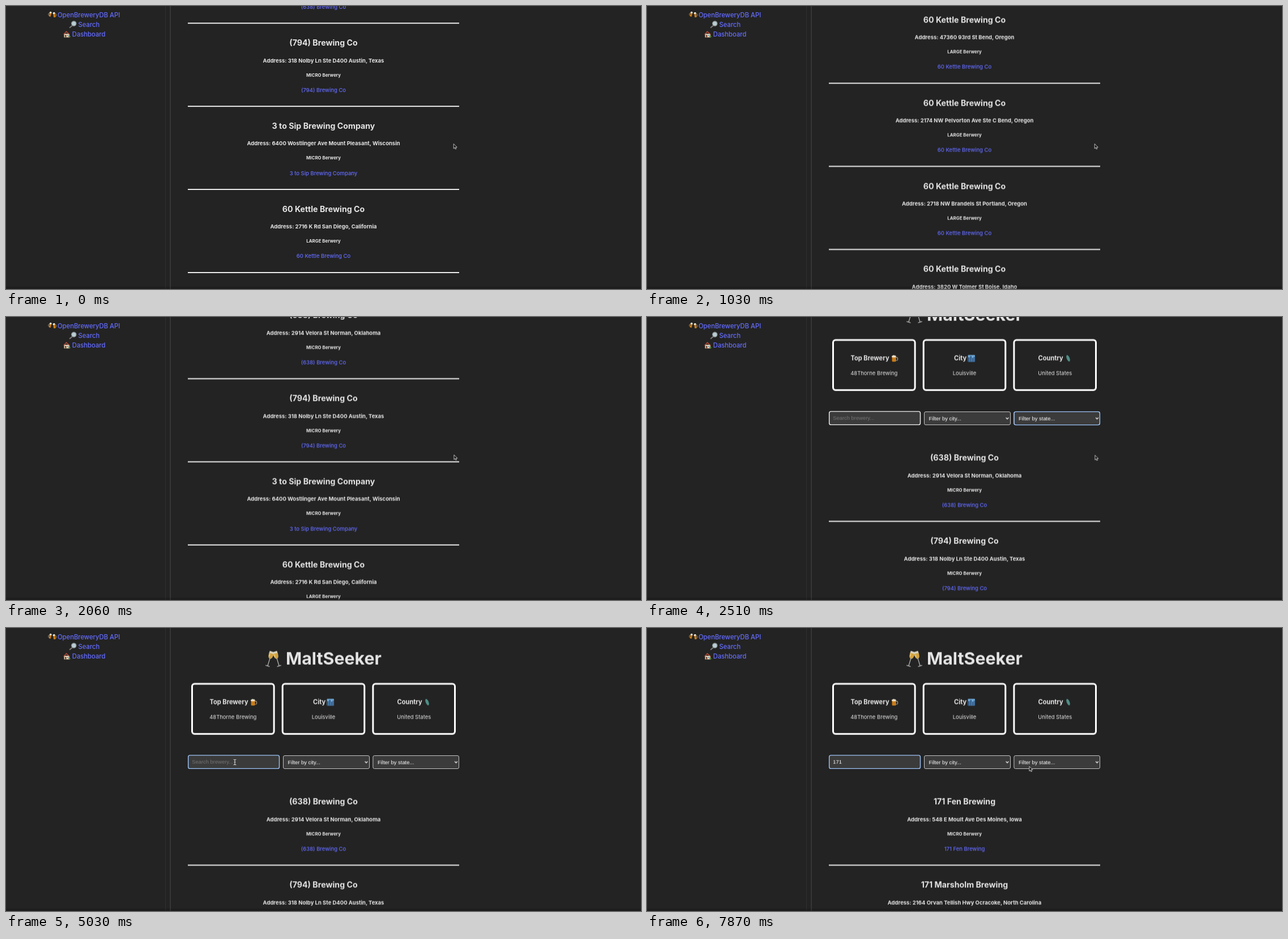
These frames come from a looping animation (1121 px wide and 500 px high, 8 s). An HTML page:

```html
<!DOCTYPE html>
<html lang="en">
<head>
<meta charset="utf-8">
<title>Brewery list</title>
<style>
html, body { margin: 0; width: 100%; height: 100%; overflow: hidden; background: #232323; }
svg { display: block; width: 1121px; height: 500px; }
text { font-family: Inter, sans-serif; font-optical-sizing: none; fill: #e4e4e4; white-space: pre; }
.mid { text-anchor: middle; }
.h1 { font-size: 30.3px; font-weight: 700; }
.h2 { font-size: 14.2px; font-weight: 700; }
.h3 { font-size: 11.08px; font-weight: 700; }
.h4 { font-size: 9.47px; font-weight: 700; }
.h5 { font-size: 7.86px; font-weight: 700; }
.p { font-size: 9.47px; }
.link { font-size: 9.47px; font-weight: 500; fill: #646cff; }
.nav { font-size: 11.24px; font-weight: 500; fill: #646cff; }
.field { font: 9.42px "Liberation Sans", Arial, sans-serif; fill: #fff; }
.hint { fill: #757575; }
.box { fill: #3b3b3b; stroke: #c4c4c4; }
.card { fill: none; stroke: #fff; stroke-width: 3; }
.edge { fill: none; stroke: #f2f2f2; stroke-width: 1.4; }
.ring { fill: none; stroke: #9cc4f7; stroke-width: 1.4; }

.anim { animation: 8s step-end -4ms infinite; }
#page { animation-name: scroll; }
#arrow { animation-name: arrow; }
#beam { animation-name: beam; }
#caret { animation-name: caret; }
#endCaret { animation-name: endCaret; }
#typed2 { animation-name: typed2; }
#typed3, #found { animation-name: late; }
#all { animation-name: early; }
#hint { animation-name: hint; }
#stateRing, #searchEdge { animation-name: beforeFocus; }
#searchRing { animation-name: afterFocus; }

@keyframes scroll {
  0% { transform: translateY(-388.6px); }
  1.875% { transform: translateY(-480px); }
  3.625% { transform: translateY(-510px); }
  9.25% { transform: translateY(-779.6px); }
  11.125% { transform: translateY(-850px); }
  12.875% { transform: translateY(-870px); }
  18.5% { transform: translateY(-790px); }
  20.25% { transform: translateY(-654.9px); }
  24% { transform: translateY(-480px); }
  25.75% { transform: translateY(-310px); }
  27.625% { transform: translateY(-260px); }
  31.375% { transform: translateY(-58px); }
  33.25% { transform: translateY(-8px); }
  35%, 100% { transform: none; }
}
@keyframes arrow {
  0% { transform: translate(789.7px, 243px); opacity: 1; }
  20.25% { transform: translate(790.4px, 243px); }
  31.375% { transform: translate(790.4px, 243.6px); }
  36.875% { transform: translate(752px, 242px); }
  38.75% { transform: translate(640px, 238px); }
  40.625% { transform: translate(500px, 235px); opacity: 1; }
  42.375% { transform: translate(674.4px, 244px); opacity: 0; }
  98.375%, 100% { transform: translate(674.4px, 244px); opacity: 1; }
}
@keyframes beam { 0%, 87.25%, 100% { opacity: 0; } 42.375% { opacity: 1; } }
@keyframes caret {
  0%, 49.75%, 62.875%, 74.125%, 87.25%, 100% { opacity: 0; }
  44.25%, 55.375%, 68.5%, 81.625% { opacity: 1; }
}
@keyframes endCaret { 0%, 96.5%, 100% { opacity: 0; } 89% { opacity: 1; } }
@keyframes typed2 { 0%, 89%, 100% { opacity: 0; } 87.25% { opacity: 1; } }
@keyframes late { 0% { opacity: 0; } 89%, 100% { opacity: 1; } }
@keyframes early { 0% { opacity: 1; } 89%, 100% { opacity: 0; } }
@keyframes hint { 0% { opacity: 1; } 87.25%, 100% { opacity: 0; } }
@keyframes beforeFocus { 0% { opacity: 1; } 44.25%, 100% { opacity: 0; } }
@keyframes afterFocus { 0% { opacity: 0; } 44.25%, 100% { opacity: 1; } }
</style>
</head>
<body>
<svg viewBox="0 0 1121 500">
  <defs>
    <g id="mug">
      <path d="M8 4.5h2.2q1.4 0 1.4 1.5v2q0 1.6-1.4 1.6H8" fill="none" stroke="#b9a98c" stroke-width="1.1"/>
      <path d="M1.6 2.5h6.8v8.3q0 1-1 1H2.6q-1 0-1-1z" fill="#d98a1f"/>
      <path d="M3.4 5v5.5M6.2 5v5.5" stroke="#a85f13" stroke-width=".9"/>
      <path d="M1 3.6q-.6-2 1.4-2.3Q4-.2 5.6.8q2.6-.4 3.2 1.6 0 1.6-1.6 1.5-.6 1.4-1.6.2-2.6.7-4.6-.5z" fill="#f0e6d2"/>
    </g>
    <g id="flute">
      <path d="M-4-13h8q.8 9-1.800 12.300-2.200 2-4.400 0Q-4.800-4-4-13z" fill="#d8d3bd"/>
      <path d="M-4-9.500h8q0 6-2.100 8.600-1.900 1.500-3.800 0Q-4-3.500-4-9.500z" fill="#d3a23c"/>
      <path d="M-2.200-8v4.500" stroke="#f2da8e" stroke-width="1.200"/>
      <path d="M0 0v13M-3.300 13.500h6.600" stroke="#b9bbb8" stroke-width="1.300" stroke-linecap="round"/>
    </g>
    <path id="chevron" d="M-2.400-1.300 0 1.200 2.400-1.300" fill="none" stroke="#fff" stroke-width="1.300"/>
    <rect id="search" x="321.700" y="224.900" width="160.800" height="23.500" rx="3"/>
  </defs>

  <rect width="1121" height="500" fill="#232323"/>
  <rect x="281" width="1" height="500" fill="#303030"/>
  <rect x="289.500" width="1.200" height="500" fill="#454545"/>

  <g id="nav">
    <use href="#mug" transform="translate(81.500 10) rotate(12) scale(-.48 .78)"/>
    <use href="#mug" transform="translate(81.800 11) rotate(-10) scale(.52 .8)"/>
    <text class="nav" x="91" y="19.500">OpenBreweryDB API</text>
    <path d="M117 34.500 112.800 38" stroke="#777" stroke-width="2.200" stroke-linecap="round"/>
    <circle cx="119.800" cy="31" r="4.200" fill="#b9cdd3" stroke="#858b8e" stroke-width="1.200"/>
    <text class="nav" x="127.600" y="36.700">Search</text>
    <path d="M102.500 49h9.500v6.500h-9.500z" fill="#dccdb4"/>
    <path d="M101 50 106.500 44l6.500 6-1 .8-5.500-4.300-4.500 4.300z" fill="#b04a35"/>
    <path d="M104 51h2.500v4.500H104z" fill="#7c4a2e"/>
    <path d="M108 51h2.500v2H108z" fill="#6fa3c4"/>
    <circle cx="112" cy="54" r="1.700" fill="#55803a"/>
    <text class="nav" x="116.800" y="53.800">Dashboard</text>
  </g>

  <g id="page" class="anim">
    <use href="#flute" transform="translate(465.800 54) rotate(17)"/>
    <use href="#flute" transform="translate(478.200 54) rotate(-17)"/>
    <text class="h1" x="494" y="65">MaltSeeker</text>

    <g id="cards"></g>
    <use href="#mug" transform="translate(431 125)"/>
    <rect x="566.500" y="125" width="12.500" height="12" rx="1" fill="#6fa9d6"/>
    <path d="M567 137v-8h2.500v8zm3.500 0v-10h2.500v10zm3.500 0v-7h2v7zm2.700 0v-9h1.800v9z" fill="#2d5583"/>
    <ellipse cx="743.500" cy="131" rx="2.600" ry="6" fill="#4f8f88" transform="rotate(-22 743.500 131)"/>

    <use href="#search" fill="#3b3b3b"/>
    <rect class="box" x="489.500" y="225.500" width="152" height="23" rx="2.500"/>
    <rect class="box" x="647.900" y="225.500" width="151.600" height="23" rx="2.500"/>
    <rect id="stateRing" class="ring anim" x="648" y="225.400" width="151.400" height="23.200" rx="3"/>
    <use id="searchEdge" class="edge anim" href="#search"/>
    <use id="searchRing" class="ring anim" href="#search"/>
    <text id="hint" class="field hint anim" x="328.200" y="240">Search brewery...</text>
    <text id="typed2" class="field anim" x="328.200" y="240">17</text>
    <text id="typed3" class="field anim" x="328.200" y="240">171</text>
    <rect id="caret" class="anim" x="328" y="232" width="1" height="10" fill="#e8e8e8"/>
    <rect id="endCaret" class="anim" x="343.300" y="232" width="1" height="10" fill="#e8e8e8"/>
    <text class="field" x="497.500" y="240.400">Filter by city...</text>
    <text class="field" x="656" y="240.400">Filter by state...</text>
    <use href="#chevron" x="636" y="237"/>
    <use href="#chevron" x="794.500" y="237"/>

    <g id="all" class="anim"></g>
    <g id="found" class="anim"></g>
  </g>

  <rect y="496" width="1121" height="4" fill="#000" opacity=".15"/>

  <path id="beam" class="anim" d="M401.600 232.200q2.400 0 2.400 1.600 0-1.600 2.400-1.600M404 233.500v7M401.600 241.800q2.400 0 2.400-1.600 0 1.600 2.400 1.600M402.600 237h2.800"
    fill="none" stroke="#d0d0d0" stroke-width="1.100"/>
  <path id="arrow" class="anim" d="M.4.500v8.300l1.900-1.700 1.200 2.800 1.500-.6-1.200-2.800h2.500z" fill="#111" stroke="#eee" stroke-width=".8" stroke-linejoin="round"/>
</svg>
<script>
const CENTER = 560.5, TOP = 307, PITCH = 146.85;
const fill = (id, html) => { document.getElementById(id).innerHTML = html; };
const label = (cls, x, y, str) => `<text class="${cls}" x="${x}" y="${y}">${str}</text>`;

const card = ([x, titleX, title, value]) =>
  `<rect class="card" x="${x + 1.5}" y="98.500" width="144.600" height="88.700" rx="4.500"/>` +
  label('h3', titleX, 135, title) + label('p mid', x + 73.8, 161, value);

const brewery = ([name, address, size = 'LARGE'], i) => {
  const y = TOP + i * PITCH;
  return label('h2 mid', CENTER, y + 5.1, name) +
    label('h4 mid', CENTER, y + 34.4, 'Address: ' + address) +
    label('h5 mid', CENTER, y + 59.4, size + ' Berwery') +
    label('link mid', CENTER, y + 86.5, name) +
    `<rect x="321" y="${y + 111.1}" width="479" height="1.8" fill="#fff"/>`;
};

fill('cards', [
  [327, 359.4, 'Top Brewery', '48Thorne Brewing'],
  [486.7, 542, 'City', 'Louisville'],
  [646.4, 690.5, 'Country', 'United States']
].map(card).join(''));

const kettle = '60 Kettle Brewing Co';
fill('all', [
  ['(638) Brewing Co', '2914 Velora St Norman, Oklahoma', 'MICRO'],
  ['(794) Brewing Co', '318 Nolby Ln Ste D400 Austin, Texas', 'MICRO'],
  ['3 to Sip Brewing Company', '6400 Wostlinger Ave Mount Pleasant, Wisconsin', 'MICRO'],
  [kettle, '2716 K Rd San Diego, California'],
  [kettle, '47360 93rd St Bend, Oregon'],
  [kettle, '2174 NW Pelvorton Ave Ste C Bend, Oregon'],
  [kettle, '2718 NW Brandels St Portland, Oregon'],
  [kettle, '3820 W Tolmer St Boise, Idaho'],
  [kettle, '2605 Quenby St Denver, Colorado']
].map(brewery).join(''));

fill('found', [
  ['171 Fen Brewing', '548 E Moult Ave Des Moines, Iowa', 'MICRO'],
  ['171 Marsholm Brewing', '2164 Orvan Tellish Hwy Ocracoke, North Carolina', 'MICRO']
].map(brewery).join(''));
</script>
</body>
</html>
```
